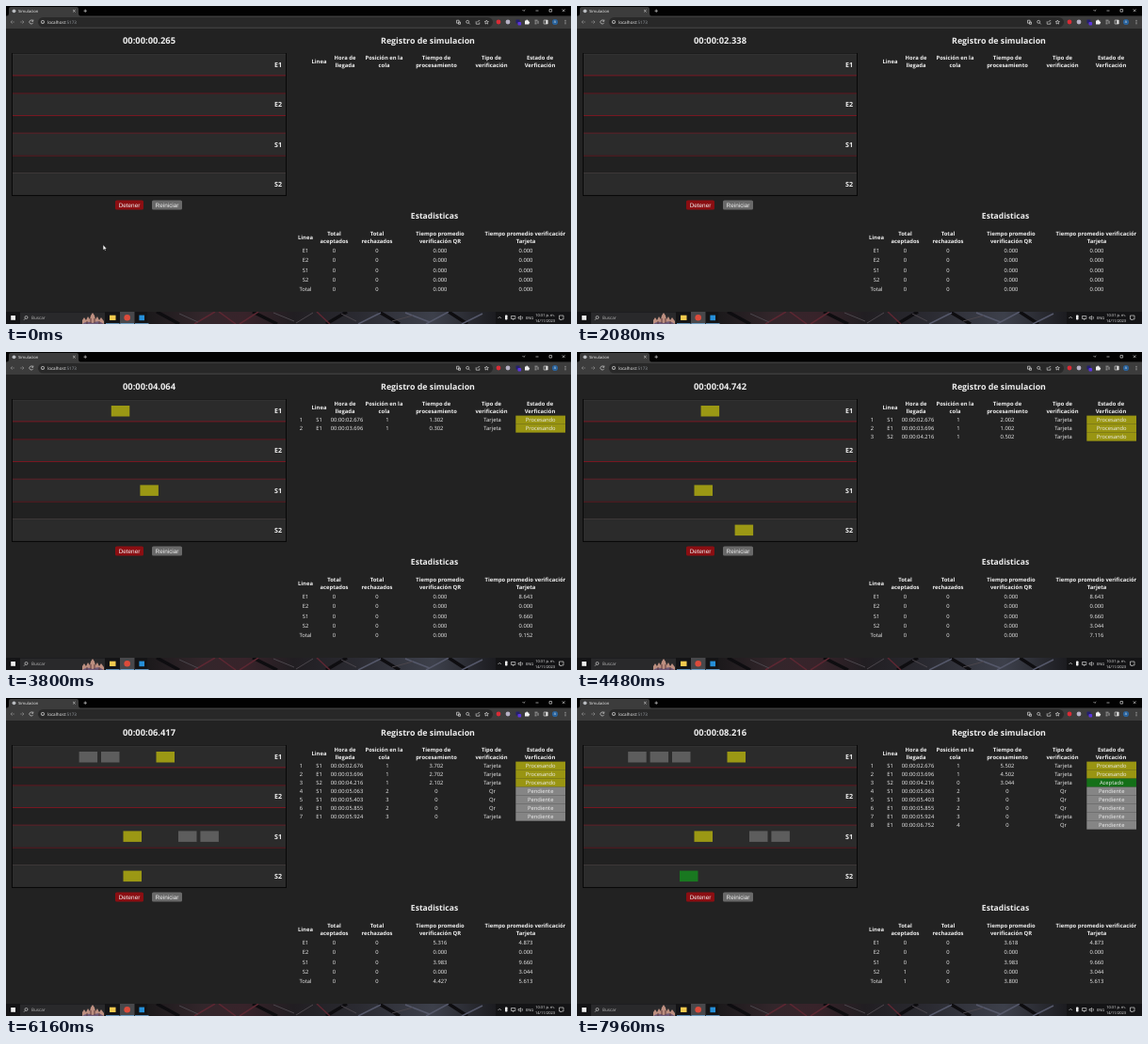
Animation of 600 by 338 pixels, one loop 8 s. Source, as an HTML page:

```html
<!DOCTYPE html>
<html lang="es">
<head>
<meta charset="utf-8">
<title>Simulacion</title>
<style>
  html, body { margin: 0; width: 100%; height: 100%; overflow: hidden; background: #222; }
  svg { display: block; width: 100vw; height: 100vh; }
  text { font-family: "Open Sans", sans-serif; font-size: 5.8px; fill: #f0f0f0; text-anchor: middle; text-rendering: geometricPrecision; white-space: pre; }
  .b { font-weight: 700; }
  .th { font-size: 5.85px; font-weight: 700; }
  .button { font: 6.4px "Liberation Sans", Arial, sans-serif; }
  .small { font-size: 4px; }
  .start { text-anchor: start; }
  .line { fill: none; stroke: #d0d0d0; stroke-width: .7; }
</style>
</head>
<body>
<svg viewBox="0 0 600 338" preserveAspectRatio="none">
  <defs>
    <linearGradient id="wall">
      <stop offset="0" stop-color="#1b191b"/>
      <stop offset=".16" stop-color="#33262b"/>
      <stop offset=".28" stop-color="#38232a"/>
      <stop offset=".42" stop-color="#211e22"/>
      <stop offset=".6" stop-color="#2a2a31"/>
      <stop offset=".82" stop-color="#3d404b"/>
      <stop offset="1" stop-color="#1c1c20"/>
    </linearGradient>
    <clipPath id="page"><rect y="24" width="594" height="301"/></clipPath>
    <clipPath id="bar"><rect x="150" y="325" width="370" height="13"/></clipPath>
  </defs>
  <rect width="600" height="338" fill="#222"/>

  <g id="browser">
    <rect width="600" height="11" fill="#020202"/>
    <path d="M1 11Q3 10 3 8V3Q3 1 5 1H75Q77 1 77 3V8Q77 10 79 11Z" fill="#3c3c3c"/>
    <rect y="10.5" width="600" height="13.5" fill="#3c3c3c"/>
    <circle cx="8.5" cy="5.3" r="1.9" fill="#b9bcc0"/>
    <text class="small start" x="13" y="6.8" style="font-size:4.2px">Simulacion</text>
    <path class="line" d="M71.2 4l2.4 2.4m0-2.4l-2.4 2.4M82.5 5.2h3.4m-1.7-1.7v3.4M548.5 4l1.4 1.4L551.3 4M562.5 5h3M577 3.5h2.6v2.6H577zM590.8 3.4l2.7 2.7m0-2.7l-2.7 2.7"/>
    <path class="line" d="M9 17H5m1.8-1.8L5 17l1.8 1.8M15 17h4m-1.8-1.8L19 17l-1.8 1.8" stroke-opacity=".45"/>
    <path class="line" d="M28.6 16a2 2 0 1 0 .1 1.8M28.8 14.5v1.7h-1.7"/>
    <rect x="34" y="12" width="483" height="10.4" rx="5.2" fill="#282828"/>
    <circle class="line" cx="39" cy="17" r="1.7"/>
    <path class="line" d="M39 16.8v1"/>
    <text class="start" x="44" y="18.6" style="font-size:4.6px">localhost<tspan fill="#9aa0a6" style="fill:#9aa0a6">:5173</tspan></text>
    <path class="line" d="M478.5 15.2h2.6v3h-2.6zM480.5 17h2v2.3h-2z"/>
    <path class="line" d="M491.3 18l1.4 1.4M499.2 16.3v2.9h3.6v-1.8M500.5 17.3q.5-1.8 2.7-1.8M510.3 15l.6 1.4 1.5.2-1.1 1 .3 1.5-1.3-.8-1.3.8.3-1.5-1.1-1 1.5-.2z" stroke-width=".55"/>
    <circle class="line" cx="490.2" cy="16.8" r="1.5"/>
    <circle cx="523" cy="17" r="2.4" fill="#d92b35"/>
    <circle cx="533" cy="17" r="2.4" fill="#b5b0c4"/>
    <rect x="541.5" y="14.5" width="4" height="4" fill="#24206b"/>
    <rect x="543.5" y="17" width="3.6" height="3.6" rx=".8" fill="#5b35dc"/>
    <path d="M551 15.5h1.3a.9.9 0 0 1 1.8 0h1.2v1.3a.9.9 0 0 1 0 1.8v1H551z" fill="#eee"/>
    <path class="line" d="M561.5 15.2h3m-3 1.8h2m-2 1.8h2m1.5-3v3M571.2 15h4v4h-4z"/>
    <path d="M573.2 15h2v4h-2z" fill="#ddd"/>
    <circle cx="583" cy="17" r="3.1" fill="#29629b"/>
    <text x="583" y="18.4" style="font-size:3.7px">A</text>
    <g fill="#ccc"><circle cx="594" cy="15.2" r=".55"/><circle cx="594" cy="17" r=".55"/><circle cx="594" cy="18.8" r=".55"/></g>
  </g>

  <g id="static" clip-path="url(#page)"></g>
  <g id="live"></g>
  <path id="cursor" d="M103.2 254v5.2l1.2-1 .8 1.8.8-.4-.8-1.7h1.6z" fill="#fff" stroke="#111" stroke-width=".25"/>

  <g id="taskbar">
    <rect y="325" width="600" height="13" fill="#141416"/>
    <g clip-path="url(#bar)" fill="none">
      <rect x="150" y="325" width="370" height="13" fill="url(#wall)"/>
      <path stroke="#0e0d10" stroke-width="3.5" d="M160 325l24 13M262 325l26 13M340 338l22-13M396 325l22 13M470 325l20 13"/>
      <path stroke="#5c2732" stroke-width="1.5" d="M200 338l22-13M226 325l18 13M248 338l20-13M330 325l14 13"/>
      <path stroke="#55586a" stroke-width="1.5" d="M374 338l24-12M424 326l26 10M446 338l24-13M484 338l22-11"/>
      <path stroke="#4b464c" d="M184 327l20 9M284 326l22 9M308 337l18-11M356 327l16 8M410 335l22-6"/>
    </g>
    <rect x="5.2" y="329" width="4.8" height="4.8" fill="#eee"/>
    <rect x="15" y="325.5" width="90" height="12.5" fill="#29292b"/>
    <circle class="line" cx="21.5" cy="331" r="1.5"/>
    <path class="line" d="M20.4 332.2l-1.4 1.5"/>
    <text class="start" x="27" y="333.2" style="font-size:4.6px;fill:#bbb">Buscar</text>
    <path d="M81 338v-4l2-3 2 3 2-4 2 3 1-4 2-3 2 3 1 4 2-3 2 4 2-3 3 4v3z" fill="#bd8f80"/>
    <path d="M81 338q5-4 11-1 6-4 12 1z" fill="#6e5a78"/>
    <path d="M86 338v-3m4 2v-5m4 5v-5m5 6v-3" stroke="#5c3b3c" stroke-width="1"/>
    <rect x="121" y="325" width="15.5" height="13" fill="#48484b"/>
    <path d="M106 337.5h14.5m1 0h14.5m1 0h14.5" stroke="#74aede" stroke-width=".8"/>
    <rect x="110" y="328.7" width="6.5" height="5.3" fill="#f3c94e"/>
    <circle cx="128.7" cy="331.3" r="3.3" fill="#dc4b3b"/>
    <rect x="141.4" y="328.6" width="5.6" height="5.6" fill="#258fd8"/>
    <path class="line" d="M522.5 332l1.7-1.7 1.7 1.7M536.5 329.5h4.3v3h-4.3zM538.7 332.5v1.5M544 330.7h1.2l1.4-1.3v4l-1.4-1.3H544zM548 330q1 1.4 0 2.8M587.5 329h4.5v4h-2l-1 1v-1h-1.5z"/>
    <rect x="530" y="328.5" width="2.5" height="5" rx=".7" fill="#eee"/>
    <text class="small" x="556" y="333">ENG</text>
    <text class="small" x="572.5" y="330">10:31 p. m.</text>
    <text class="small" x="572.5" y="336.2">14/11/2023</text>
  </g>
</svg>
<script>
const LOOP = 8000, STEP = 40;
const CRUISE = 29.25, EXIT = 17.25, TRAVEL = 2, SLOT = 23.4;
const laneTop = { E1: 51, E2: 93.2, S1: 135.4, S2: 177.6 };
const LANE_HEIGHT = 23.2;
const lanes = Object.keys(laneTop);
const statusColor = { Procesando: '#999512', Pendiente: '#858585', Aceptado: '#147018' };
const carColor = { Procesando: '#9b9814', Pendiente: '#5d5d5d', Aceptado: '#197820' };

// lane, arrival (ms), queue place, verification, duration (s)
const arrivals = [
  ['S1', 2676, 1, 'Tarjeta', 9.6602],
  ['E1', 3696, 1, 'Tarjeta', 8.643],
  ['S2', 4216, 1, 'Tarjeta', 3.044],
  ['S1', 5063, 2, 'Qr', 3.983],
  ['S1', 5403, 3, 'Qr', 3.983],
  ['E1', 5855, 2, 'Qr', 5.316],
  ['E1', 5924, 3, 'Tarjeta', 1.1035],
  ['E1', 6752, 4, 'Qr', 1.9195]
].map(([lane, at, place, kind, duration]) => ({ lane, at, place, kind, duration }));

// page time -> simulation clock, which drifts by a few ms
const clockPoints = [[0, 265], [1160, 1416], [2840, 3100], [3800, 4064], [5160, 5419], [6160, 6417], [7960, 8216]];

const text = (x, y, value, cls = '', size = 0) =>
  `<text x="${x}" y="${y}" class="${cls}"${size ? ` style="font-size:${size}px"` : ''}>${value}</text>`;
const rect = (x, y, w, h, fill, extra = '') =>
  `<rect x="${x}" y="${y}" width="${w}" height="${h}" fill="${fill}" ${extra}/>`;
const heading = (x, y, gap, ...rows) =>
  rows.map((row, i) => text(x, y + (i - (rows.length - 1) / 2) * gap, row, 'th')).join('');

function drawStatic() {
  let out = rect(6.5, 50.5, 291, 151, '#212121', 'stroke="#080808" stroke-width="1"');
  for (const lane of lanes) {
    const y = laneTop[lane];
    out += rect(7, y, 290, LANE_HEIGHT, '#2b2b2b');
    out += text(289, y + 14.2, lane, 'b', 7.1);
  }
  const borders = [[51, '#3a3a3a'], [73.9, '#8b1320'], [92.9, '#71141e'], [116.5, '#8b1320'],
    [135.1, '#71202a'], [159.2, '#661820'], [177.5, '#433b3c']];
  for (const [y, color] of borders) out += rect(7, y - .4, 290, .8, color);

  out += rect(116, 206.4, 30, 10.2, '#8b0e12', 'rx="1.6"') + text(131, 213.7, 'Detener', 'button');
  out += rect(155, 206.4, 32, 10.2, '#696969', 'rx="1.6"') + text(171, 213.7, 'Reiniciar', 'button');

  out += text(448, 40, 'Registro de simulacion', 'b', 8.85);
  out += heading(332.5, 61.2, 8, 'Linea') + heading(360, 61.2, 8, 'Hora de', 'llegada')
    + heading(401.5, 61.2, 8, 'Posición en la', 'cola') + heading(457, 61.2, 8, 'Tiempo de', 'procesamiento')
    + heading(515.5, 61.2, 8, 'Tipo de', 'verificación') + heading(567, 61.2, 8, 'Estado de', 'Verficación');

  out += text(455, 226, 'Estadisticas', 'b', 8.55);
  out += heading(318, 247.7, 8.4, 'Linea') + heading(348.5, 247.7, 8.4, 'Total', 'aceptados')
    + heading(394, 247.7, 8.4, 'Total', 'rechazados') + heading(461, 247.7, 8.4, 'Tiempo promedio', 'verificación QR')
    + heading(552, 247.7, 8.4, 'Tiempo promedio verificación', 'Tarjeta');
  return out;
}

function clockAt(t) {
  let i = 1;
  while (i < clockPoints.length - 1 && t > clockPoints[i][0]) i++;
  const [[t0, c0], [t1, c1]] = [clockPoints[i - 1], clockPoints[i]];
  return Math.round(c0 + (c1 - c0) * (t - t0) / (t1 - t0));
}

const stamp = ms => '00:00:0' + (ms / 1000).toFixed(3);

function stateOf(car, clock) {
  if (car.place > 1) return { status: 'Pendiente', place: car.place, spent: '0' };
  const ticks = Math.max(0, Math.floor((clock - car.at - 5) / 100));
  if (ticks >= car.duration * 10) return { status: 'Aceptado', place: 0, spent: car.duration.toFixed(3) };
  return { status: 'Procesando', place: 1, spent: ticks ? (ticks / 10 + .002).toFixed(3) : '0' };
}

function carX(car, status, clock) {
  const age = (clock - car.at) / 1000;
  let travel = -SLOT * (car.place - 2);
  if (status !== 'Pendiente') travel = CRUISE * Math.min(TRAVEL, Math.max(0, age));
  if (status === 'Aceptado') travel += EXIT * (age - Math.ceil(car.duration * 10) / 10);
  return car.lane[0] === 'E' ? 101 + travel : 183 - travel;
}

function average(cars, kind) {
  const times = cars.filter(car => car.kind === kind).map(car => car.duration);
  return (times.reduce((a, b) => a + b, 0) / (times.length || 1)).toFixed(3);
}

function drawLive(clock) {
  const cars = arrivals.filter(car => car.at <= clock)
    .map(car => ({ ...car, state: stateOf(car, clock) }));
  let out = text(152, 40.2, stamp(clock), 'b', 9.35);

  cars.forEach((car, i) => {
    const { status, place, spent } = car.state;
    const y = 74.2 + 9 * i;
    out += rect(carX(car, status, clock), laneTop[car.lane] + 6, 19.5, 11.5, carColor[status]);
    out += rect(541.3, y - 6.6, 52.7, 9.05, statusColor[status]);
    out += text(313.5, y, i + 1) + text(332.5, y, car.lane) + text(362, y, stamp(car.at))
      + text(405, y, place) + text(457, y, spent) + text(516.5, y, car.kind) + text(567.7, y, status);
  });

  [...lanes, 'Total'].forEach((name, i) => {
    const group = cars.filter(car => name === 'Total' || car.lane === name);
    const accepted = group.filter(car => car.state.status === 'Aceptado').length;
    const y = 261.9 + 10.35 * i;
    out += text(318, y, name) + text(348.5, y, accepted) + text(394, y, 0)
      + text(461, y, average(group, 'Qr')) + text(552, y, average(group, 'Tarjeta'));
  });
  return out;
}

const live = document.getElementById('live');
const cursor = document.getElementById('cursor');
document.getElementById('static').innerHTML = drawStatic();

let shown = -1;
const begin = performance.now();
function render() {
  const t = Math.floor(((performance.now() - begin) % LOOP) / STEP) * STEP;
  if (t !== shown) {
    shown = t;
    live.innerHTML = drawLive(clockAt(t));
    cursor.style.display = t < 440 ? '' : 'none';
  }
  requestAnimationFrame(render);
}
render();
</script>
</body>
</html>
```
